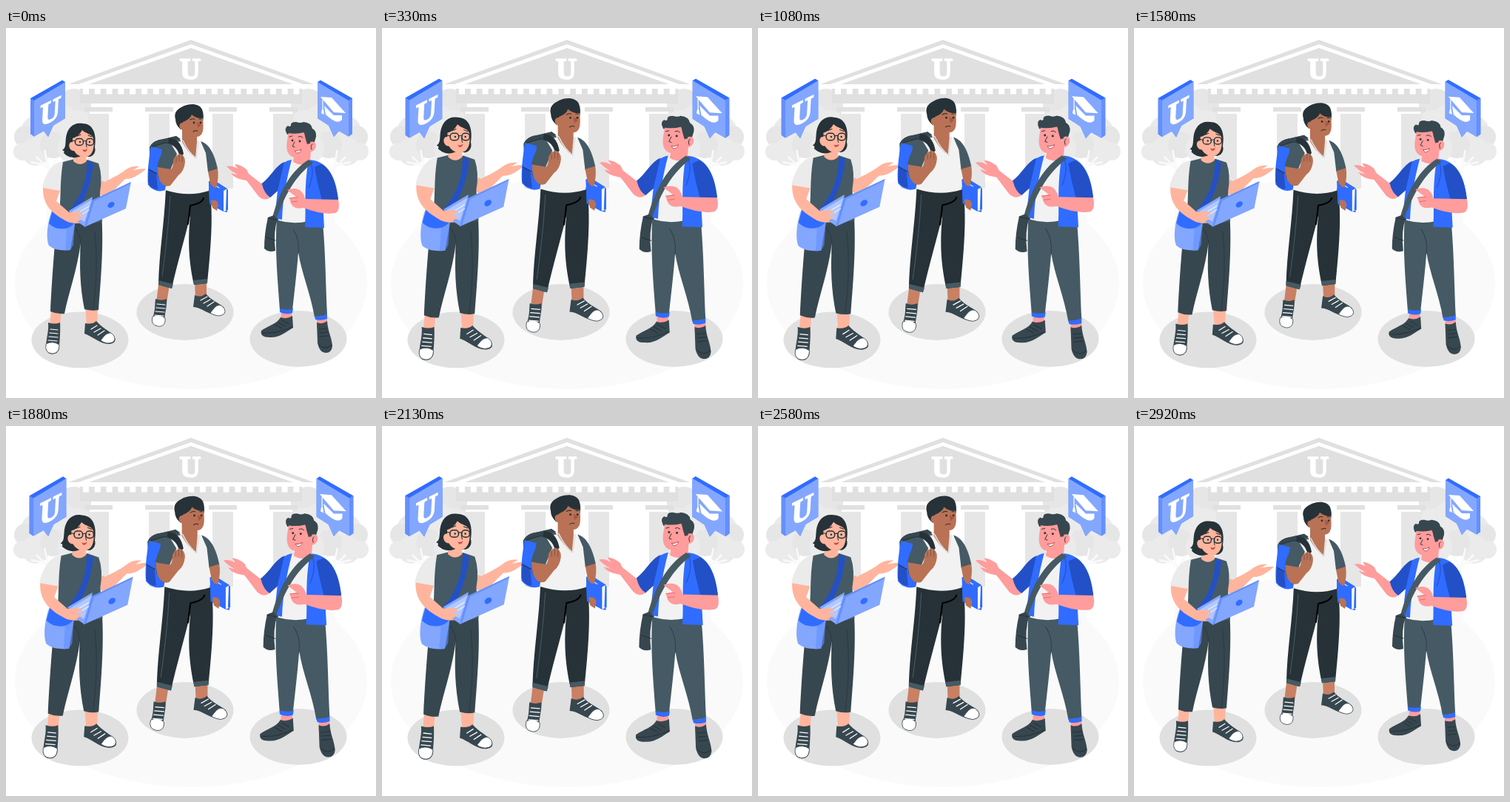
Animation, 500 px wide and 500 px high, one loop 2.96 s. Source, as an HTML page:

```html
<!DOCTYPE html>
<html lang="en">
<head>
<meta charset="utf-8">
<title>Students</title>
<style>
html,body{margin:0;width:100%;height:100%;overflow:hidden;background:#fff}
svg{display:block;width:100vw;height:100vh}
text{font-family:"Noto Serif","Liberation Serif",serif;font-weight:700;fill:#fff;stroke:#fff;stroke-width:1.5;text-anchor:middle}
.skin{fill:#ffb59d}.brown{fill:#b97255}.pink{fill:#ff9c9c}
.blue{fill:#306cff}.deep{fill:#2350c6}.light{fill:#83a7ff}.mid{fill:#6490ff}
.ink{fill:#263238}.slate{fill:#455a64}.coal{fill:#37474f}.pale{fill:#ebebeb}.white{fill:#fff}
.toe{fill:#fff;stroke:#37474f;stroke-width:.8}
.line{fill:none;stroke:#263238;stroke-linecap:round;stroke-linejoin:round;stroke-width:1}
.lace{fill:none;stroke:#fff;stroke-width:1.2;stroke-linecap:round}
</style>
</head>
<body>
<svg viewBox="0 0 500 500">
<ellipse cx="250" cy="345" rx="238" ry="143" fill="#fafafa"/>
<g id="trees"></g>
<g id="building">
  <path fill="#e0e0e0" d="M250 16L416 76H402L250 22 98 76H84ZM250 27L388 76H112Z"/>
  <path fill="#e0e0e0" d="M100 82H400V102H100Z"/>
  <g id="notches" fill="#fff"></g>
  <g id="columns"></g>
  <text x="249" y="69" font-size="38">U</text>
</g>
<g fill="#e0e0e0">
  <ellipse cx="100" cy="421.500" rx="65.500" ry="38"/>
  <ellipse cx="242" cy="384" rx="65.500" ry="38"/>
  <ellipse cx="395" cy="420" rx="65.500" ry="38"/>
</g>

<g class="pulse" data-cx="56.5" data-cy="109">
  <path class="blue" d="M33 95L76 70.500 80 73V122L64 131 57 147 51 139 38 146.500 33 143Z"/>
  <path class="light" d="M38 98L80 73V122L64 132 57 147 51 139.500 38 146.500Z"/>
  <path class="mid" d="M33 95L38 98V146.500L33 143Z"/>
  <text transform="matrix(1 -.5 -.06 1.08 59 127)" font-size="37">U</text>
</g>
<g class="pulse" data-cx="444.5" data-cy="109">
  <path class="blue" d="M421 73L425 70.500 468 95V143L463 146.500 450 139 443 147 436 131 421 122Z"/>
  <path class="light" d="M421 73L463 98V146.500L450 139.500 443 147 436 132 421 122Z"/>
  <path class="mid" d="M463 98L468 95V143L463 146.500Z"/>
  <path class="white" d="M425 93L440 94 459 115 443 114ZM430 105L443 118 454 118V124Q448 132 432 117Z"/>
  <path class="lace" d="M428 97V112"/><path class="white" d="M427 110H429L430 117 426 115Z"/>
</g>

<g class="pulse" data-cx="120" data-cy="284.5">
  <path class="skin" d="M61 380H75L73 404H59ZM107 377H124L123 404 109 402Z"/>
  <path class="coal" d="M57 398Q66 401 73 398C74 411 72 426 72 433Q70 441 62 440.500Q53 440 54 429C55 417 58 409 57 398ZM107 399Q117 401 122 396C130 405 139 409 145 415Q152 425 140 427C128 428 116 416 106 413Z"/>
  <path class="toe" d="M54 427Q63 422 72 428C72 437 68 440 62 440Q52 439 54 427ZM132 417Q136 412 142 412L146 416Q150 425 138 426 131 425 128 422Z"/>
  <path class="lace" d="M60 407L70 408M59 412 70 413M58 417 70 418M57 422 69 423M115 407 123 402M119 411 128 406M124 415 133 409"/>
  <path class="coal" d="M71 245L129 250C132 292 129 330 125 381Q116 383 106 380C100 350 99 322 101 290C96 328 85 356 79 386Q69 387 60 383C62 340 66 285 71 245Z"/>
  <path class="line" d="M94 271C103 285 101 293 101 304M120 276Q125 323 118 380" opacity=".6"/>
  <path class="pale" d="M78 180C62 181 53 199 49 215Q60 223 73 222ZM123 183Q131 193 130 211L124 222Z"/>
  <path class="skin" d="M129 206L133 208C145 202 155 197 161 192Q169 186 180 187L172 192Q180 190 189 190Q186 194 179 198 171 204 161 204L139 226Q132 230 126 223Z"/>
  <path class="slate" d="M77 181L93 177Q102 185 110 178L125 183Q131 200 127 222L130 261Q99 270 71 258C75 236 72 210 77 181Z"/>
  <path class="skin" d="M91 165L108 169 109 180Q100 188 91 180Z"/>
  <path class="ink" d="M103 129C91 127 83 135 81 148C80 158 81 162 76 165Q80 166 78 169C86 177 95 176 101 173L113 174C118 173 122 168 120 161C123 142 117 129 103 129Z"/>
  <path class="skin" d="M90 149Q98 147 103 138C108 143 116 143 118 149C120 160 118 173 108 174Q97 175 92 166C84 166 83 153 90 154Z"/>
  <path class="line" d="M104 153Q107 152 109 153M94 153 86 151M96 146 101 144M111 145 116 147M108 155 109 161"/>
  <g style="stroke-width:1.4"><rect class="line" x="93.500" y="149.500" width="11" height="9" rx="4" style="stroke-width:1.4"/><rect class="line" x="108.500" y="149.500" width="10" height="9" rx="4" style="stroke-width:1.4"/></g>
  <circle class="ink" cx="100" cy="154" r="1.200"/><circle class="ink" cx="113" cy="154" r="1.200"/>
  <path d="M103 164Q107 166 110 163Q109 168 105 167Z" fill="#c84848"/>
  <path class="deep" d="M110 179L118 183C115 211 105 237 91 254L83 249C101 230 109 209 110 179Z"/>
  <path class="light" d="M62 247C55 265 54 286 58 294Q67 302 87 300L94 259Z"/>
  <path class="mid" d="M82 270L93 264 91 293 87 300 80 301Z" opacity=".6"/>
  <path class="blue" d="M63 246L96 257Q92 268 81 271 66 273 58 264Z"/>
  <path class="skin" d="M50 216L73 220 68 234 85 249Q100 247 105 254L103 263Q88 266 78 259C62 250 49 238 50 216Z"/>
  <path class="light" d="M85 247L117 228 116 236 107 269 94 260Z"/>
  <path d="M89 248L116 232 106 262 96 256Z" fill="#b2c8ff"/>
  <path class="light" d="M116 233L169 208 162 244 106 269Z"/>
  <path class="mid" d="M116 233L169 208 167 211 119 234 109 267 106 269Z"/>
  <path class="lace" d="M97 250L112 241M101 253 112 246" opacity=".7"/>
  <ellipse class="blue" cx="142" cy="239" rx="5" ry="3.500" transform="rotate(-36 142 239)"/>
  <path class="skin" d="M84 249L100 248 105 253 94 253 104 257 96 262Q87 262 80 257Z"/>
</g>

<g class="pulse" data-cx="244.5" data-cy="253.5">
  <path d="M206 347H221L217 372H203ZM255 342H271V365L256 366Z" fill="#c98064"/>
  <path class="coal" d="M202 366Q210 369 217 366C218 379 213 388 215 397Q211 405 202 402 195 399 199 389C202 379 201 374 202 366ZM255 361Q263 365 270 359C277 368 287 371 294 377Q300 387 288 389C274 388 263 377 253 377Z"/>
  <path class="toe" d="M198 390Q207 385 215 392C216 401 211 404 205 403Q195 401 198 390ZM280 380Q285 373 291 375L295 379Q299 387 288 389 280 388 276 385Z"/>
  <path class="lace" d="M204 373L215 374M203 378 215 379M202 383 214 384M201 388 213 389M263 368 272 363M267 372 276 367M272 376 281 370"/>
  <path class="ink" d="M216 217H275C281 254 276 304 272 345L254 347C248 320 245 292 249 253C242 283 231 320 224 352L206 347C207 302 214 265 216 217Z"/>
  <path class="slate" d="M206 341L226 346 224 352 206 347ZM253 341 272 339V345L254 347Z"/>
  <path class="line" d="M267 230Q265 237 249 240L246 265" style="stroke:#000;stroke-width:2"/>
  <path class="line" d="M222 227Q219 280 211 335" style="stroke:#455a64"/>
  <path class="slate" d="M194 162Q197 152 213 150L230 146Q242 154 239 173L217 216Q203 220 196 214Z"/>
  <path class="coal" d="M194 162Q197 152 213 150L230 146 236 150 216 155 199 161Z"/>
  <path class="blue" d="M196 160L211 164 205 201 218 218Q203 225 192 212 190 193 196 160Z"/>
  <path class="deep" d="M193 191L203 197 205 218Q194 217 192 208Z"/>
  <path class="line" d="M198 160L216 155 230 157M193 191 204 197"/>
  <path d="M223 157Q239 150 259 153L274 161 274 220Q247 229 215 219C218 205 217 187 223 157Z" fill="#f2f2f2"/>
  <path class="slate" d="M222 155C211 164 207 177 204 187Q214 193 222 192L231 170ZM263 153C277 157 283 176 286 190Q281 194 273 195L270 169Z"/>
  <path class="brown" d="M238 134L258 143 258 154 256 176Q245 167 238 154Z"/>
  <path class="line" d="M239 152Q247 169 257 176L260 153" style="stroke:#e0e0e0;stroke-width:1.5"/>
  <path class="ink" d="M220 149Q236 149 240 170L235 176Q233 160 219 156Z"/>
  <path class="ink" d="M229 123C226 112 235 108 241 105C251 101 262 103 265 110Q268 118 266 126L262 133 236 137Q229 131 229 123Z"/>
  <path class="brown" d="M239 127Q249 123 251 117 258 123 266 122C267 134 268 146 258 147Q246 147 241 138C233 139 232 127 239 128Z"/>
  <path class="line" d="M249 124Q252 122 255 123M261 123 264 123M253 140Q256 138 259 139"/>
  <circle class="ink" cx="254" cy="128" r="1.400"/><circle class="ink" cx="263" cy="128" r="1.400"/>
  <path d="M258 127L264 131 259 135Z" fill="#a85545"/>
  <path class="brown" d="M205 188L223 191Q226 188 226 179 227 173 235 170 242 172 242 181 241 193 233 199L222 213Q214 216 209 208 205 202 205 188Z"/>
  <path class="line" d="M230 175V181M234 172V180M238 173V181" opacity=".4"/>
  <path class="blue" d="M274 207L280 205 299 217V249L294 248 275 237Z"/>
  <path class="white" d="M294 220L299 217V246L294 248Z"/>
  <path class="blue" d="M274 207L294 219V248L275 238ZM298 217L300 219V246L297 246Z"/>
  <path class="lace" d="M280 211L288 216" opacity=".8"/>
  <path class="brown" d="M273 194L286 190Q288 202 284 216L280 215 276 210ZM277 233Q286 231 287 239L285 247 279 243Z"/>
</g>

<g class="pulse" data-cx="373.5" data-cy="283.5">
  <path class="pink" d="M372 382H386L387 399H371ZM420 390H434V405H420Z"/>
  <path class="coal" d="M371 391Q380 394 387 389L388 405C379 410 370 419 356 418Q343 418 345 409C355 402 366 400 371 391ZM420 398Q428 401 434 396C435 411 440 417 441 430Q440 439 432 439 424 439 421 426Z"/>
  <path class="line" d="M346 412Q364 414 387 404M423 428Q432 436 440 428M364 401 373 406M368 398 377 403M373 395 382 400M423 407 434 406M424 412 435 411M424 417 436 416"/>
  <path class="slate" d="M366 255L428 262C432 308 432 349 434 388L417 391C412 360 399 330 395 303C393 330 390 354 387 382L370 381C367 340 363 300 366 255Z"/>
  <path class="line" d="M388 272Q397 285 395 305" opacity=".65"/>
  <path class="blue" d="M370 379Q380 382 388 379L387 385Q379 388 370 384ZM417 389Q427 391 434 386V393Q426 396 418 394Z"/>
  <path class="pale" d="M379 181Q397 177 413 179L409 261Q388 266 368 260Z" style="fill:#f2f2f2"/>
  <path class="blue" d="M386 178C368 181 360 200 345 211Q349 224 357 229L367 220 363 257 373 259C374 231 379 205 386 178ZM409 178C433 179 446 199 449 232L428 235 430 270 404 269C406 242 402 217 409 178Z"/>
  <path class="deep" d="M376 181C364 186 358 201 345 211Q349 224 357 229L367 220ZM417 188Q420 208 428 235L449 232C446 209 439 190 426 184Z"/>
  <path class="line" d="M411 181Q418 194 409 216M421 205 428 235" style="stroke:#2350c6"/>
  <path class="pink" d="M391 165H412L411 179Q400 189 388 181Z"/>
  <path class="coal" d="M380 144Q375 135 381 132 383 134 385 132 384 127 392 127 398 129 402 127 413 128 414 136 420 139 419 147L415 160 405 158 396 139Z"/>
  <path class="pink" d="M382 140Q391 143 402 140L409 155Q417 151 419 158 419 167 409 168C404 178 388 178 382 170C377 163 380 152 382 140Z"/>
  <path class="coal" d="M381 142C379 134 387 132 394 133L411 139 411 156 407 157Q404 148 403 141 392 144 381 142Z"/>
  <path class="line" d="M383 147 387 146M395 147Q398 145 401 148M390 154 387 160 390 161M414 157Q411 158 413 164" style="stroke-width:.9"/>
  <circle class="ink" cx="387" cy="152" r="1.400"/><circle class="ink" cx="397" cy="153" r="1.400"/>
  <path class="white" d="M390 166Q395 167 399 164 398 169 393 169Z" stroke="#a83f48" stroke-width=".8"/>
  <path class="slate" d="M409 178L415 182C391 200 377 225 365 259L360 256C370 219 386 192 409 178Z"/>
  <path class="coal" d="M354 256L362 253 367 258Q361 275 364 301 355 304 349 298 349 278 354 256Z"/>
  <path class="line" d="M352 283L364 287M354 257 366 259"/>
  <path class="pink" d="M298 187Q305 185 313 190L309 184Q316 184 325 191L328 197 346 211Q349 224 357 229 349 235 341 227L325 206Q309 204 304 196L313 198Q306 195 298 187Z"/>
  <path class="pink" d="M380 219Q390 215 397 219 403 224 404 231L449 232Q452 247 445 250 428 253 402 243 389 246 385 237L383 230 392 228Z"/>
  <path class="line" d="M383 230L394 229M386 235 394 234" style="stroke:#e66e73"/>
</g>
</svg>
<script>
const byId = id => document.getElementById(id);

byId("notches").innerHTML = Array.from({length: 19}, (_, i) =>
  `<rect x="${104 + i * 15.8}" y="82" width="8" height="7.500"/>`).join("");

byId("columns").innerHTML = '<path fill="#fafafa" d="M55 217H445V268H55Z"/>' +
  [106, 188, 274, 356].map(x =>
    `<path fill="#e0e0e0" d="M${x} 107h38v6h-38z"/>
     <path fill="#e6e6e6" d="M${x + 5} 116h28v101h-28z"/>`).join("");

const lobes = [[92, 105, 23], [72, 128, 26], [38, 137, 17], [26, 147, 15], [22, 167, 12],
  [40, 167, 19], [64, 158, 18], [96, 135, 24], [90, 163, 20]];
const tree = lobes.map(([x, y, r], i) =>
  `<circle cx="${x}" cy="${y}" r="${r}" fill="${i % 3 ? "#ebebeb" : "#e6e6e6"}"/>`).join("") +
  `<path d="M62 213L57 190 41 174M58 194 69 176M58 191 52 165M55 186 34 181" fill="none"
    stroke="#fafafa" stroke-width="2.500"/>`;
byId("trees").innerHTML = `<g>${tree}</g><g transform="matrix(-1 0 0 1 500 0)">${tree}</g>`;

const LOOP = 2960, TURN = 1465;
// Time and scale for the swell, which then runs backwards.
const keys = [[0, 1], [220, 1.035], [350, 1.056], [540, 1.1], [670, 1.088],
  [780, 1.066], [1080, 1.054], [1350, 1.012], [TURN, 1]];

function scaleAt(time) {
  const t = time < TURN ? time : Math.max(0, 2 * TURN - time);
  const next = Math.max(1, keys.findIndex(key => key[0] >= t));
  const [t0, s0] = keys[next - 1], [t1, s1] = keys[next];
  return s0 + (s1 - s0) * (t - t0) / (t1 - t0);
}

const groups = [...document.querySelectorAll(".pulse")];
function draw(time) {
  const s = scaleAt(time);
  for (const group of groups) {
    const {cx, cy} = group.dataset;
    group.setAttribute("transform", `translate(${cx} ${cy}) scale(${s}) translate(${-cx} ${-cy})`);
  }
}

const start = performance.now();
function tick() {
  draw((performance.now() - start) % LOOP);
  requestAnimationFrame(tick);
}
tick();
</script>
</body>
</html>
```
